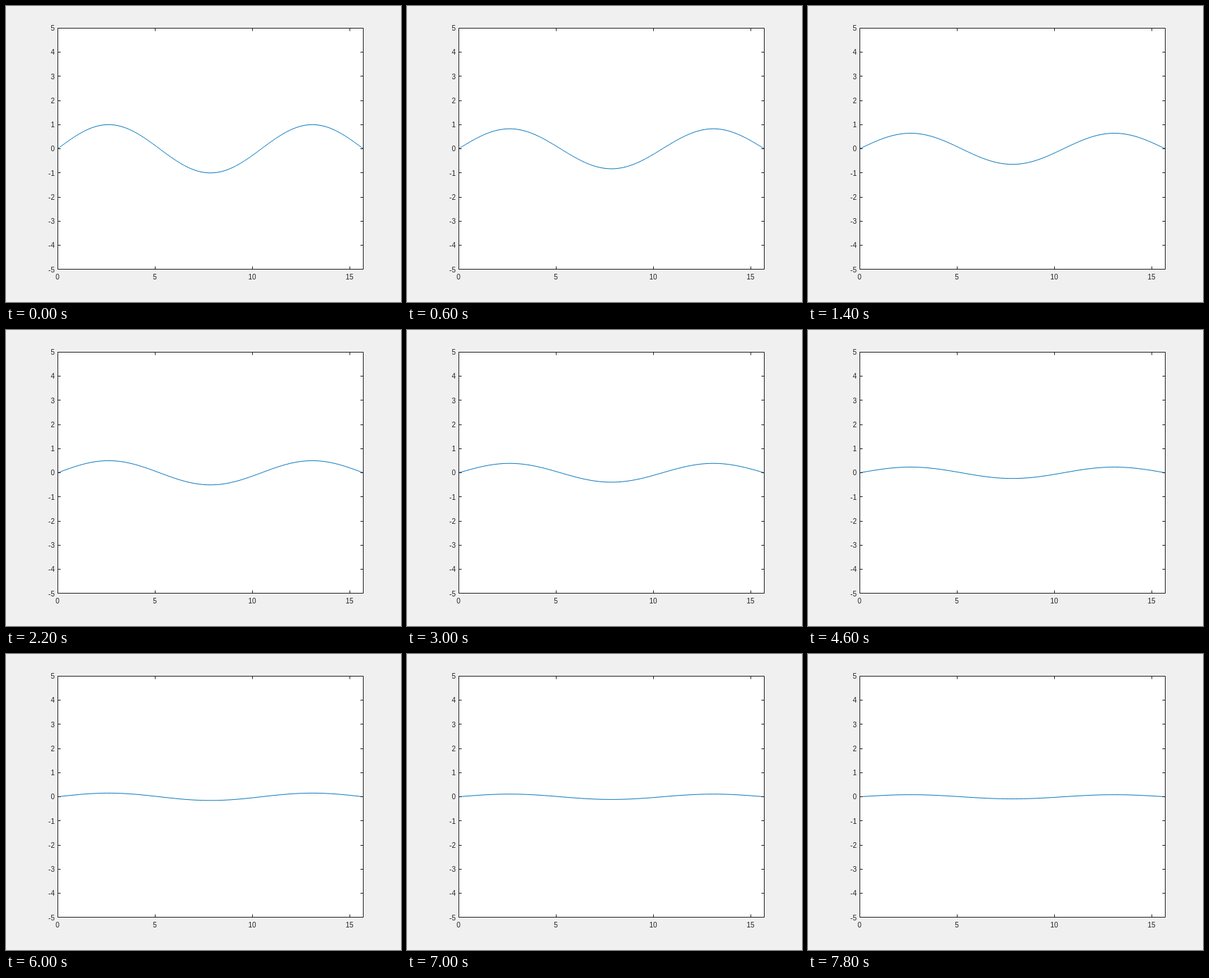
Write an HTML page that moves like this. It is 560x420 px and loops after 8 s.

```html
<!DOCTYPE html>
<html lang="en">
<head>
<meta charset="utf-8">
<title>Decaying sine wave</title>
<style>
  html, body { margin: 0; width: 100%; height: 100%; overflow: hidden; background: #f0f0f0; }
  svg { display: block; }
  text { font: 10px "Liberation Sans", Arial, sans-serif; fill: #262626; }
  .axis { fill: none; stroke: #262626; }
  #wave { fill: none; stroke: #0072bd; stroke-linejoin: round; }
</style>
</head>
<body>
<svg width="560" height="420" viewBox="0 0 560 420">
  <rect x="73" y="31" width="434" height="343" fill="#fff"/>
  <path id="wave"/>
  <path id="frame" class="axis"/>
  <g id="labels"></g>
</svg>
<script>
const LOOP = 8000, STEP = 200, DECAY = Math.PI / 50;
const X_MAX = 5 * Math.PI, TICK = 4;
const LEFT = 73.5, RIGHT = 506.5, TOP = 31.5, BOTTOM = 373.5;

const toX = x => 73.2 + x / X_MAX * 433.4;
const toY = y => 202.6 - y * 34.23;
const snap = v => Math.floor(v) + 0.5;
const byId = id => document.getElementById(id);

function addLabel(value, x, y, anchor) {
  const label = document.createElementNS("http://www.w3.org/2000/svg", "text");
  label.setAttribute("x", x);
  label.setAttribute("y", y);
  label.setAttribute("text-anchor", anchor);
  label.textContent = value;
  byId("labels").append(label);
}

function drawAxes() {
  let path = `M${LEFT} ${TOP}H${RIGHT}V${BOTTOM}H${LEFT}Z`;
  for (let x = 0; x <= 15; x += 5) {
    const px = snap(toX(x));
    path += `M${px} ${BOTTOM}v${-TICK}M${px} ${TOP}v${TICK}`;
    addLabel(x, px - 0.5, 388, "middle");
  }
  for (let y = -5; y <= 5; y++) {
    const py = snap(toY(y));
    path += `M${LEFT} ${py}h${TICK}M${RIGHT} ${py}h${-TICK}`;
    addLabel(y, 69, Math.round(toY(y) - 0.2) + 3.5, "end");
  }
  byId("frame").setAttribute("d", path);
}

function drawWave(amplitude) {
  const points = [];
  for (let i = 0; i <= 250; i++) {
    const x = X_MAX * i / 250;
    points.push(`${toX(x).toFixed(2)} ${toY(amplitude * Math.sin(0.6 * x)).toFixed(2)}`);
  }
  byId("wave").setAttribute("d", "M" + points.join("L"));
}

const start = performance.now();
function render() {
  const step = Math.floor((performance.now() - start) % LOOP / STEP);
  drawWave(Math.exp(-DECAY * step));
  requestAnimationFrame(render);
}

drawAxes();
render();
</script>
</body>
</html>
```
